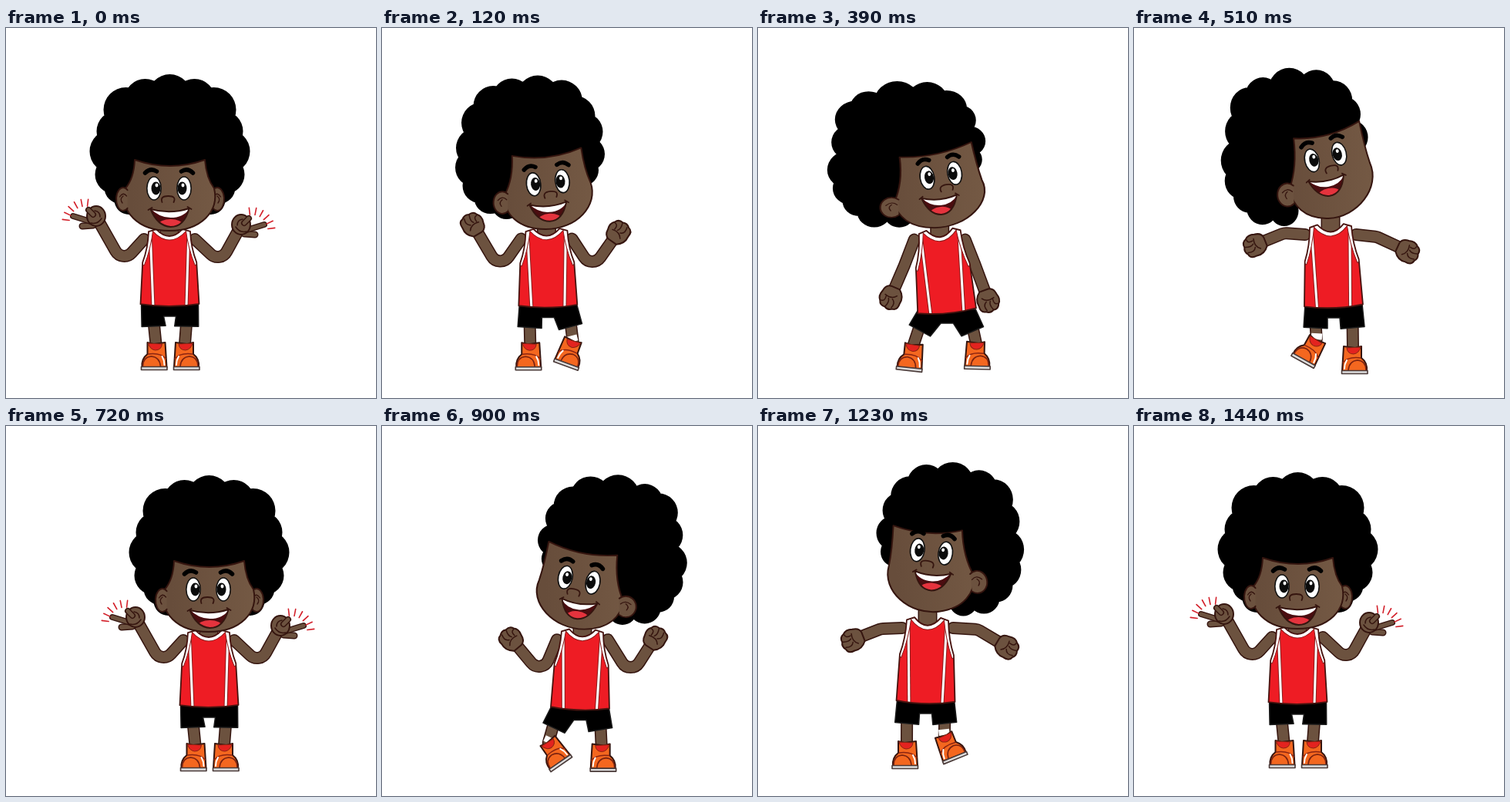
Recreate the animation shown at these times as an HTML page with a canvas. Size 480x480 px, loop 1.47 s.

```html
<!DOCTYPE html>
<html lang="en">
<head>
<meta charset="utf-8">
<title>Dancing boy</title>
<style>
  html, body { margin: 0; width: 100%; height: 100%; overflow: hidden; background: #fff; }
  canvas { display: block; }
</style>
</head>
<body>
<canvas id="stage" width="480" height="480"></canvas>
<script>
const ctx = document.getElementById('stage').getContext('2d');
const SKIN = '#6c523f', LINE = '#35150f', RED = '#ee1c24', ORANGE = '#f4671f';
const TAU = Math.PI * 2, FRAME = 30, FRAMES = 49, BEAT = 24;

// Parts are [x, y, rotation, scaleX, scaleY]; for hair the third value is the turn of the head.
const snap = {
  hair: [212.5, 151, 0, 1, 1], face: [213, 263, 0, 1, 1], eyes: [211.5, 208, 0],
  neck: [212, 264], hem: [212.5, 359],
  elbowL: [151, 305], handL: [117, 245], elbowR: [278, 305], handR: [305, 256],
  footL: [192.5, 443, 0], footR: [234, 443, 0]
};
const windup = {
  hair: [171.5, 159, 1, 1, 1], face: [211, 259, 0, 1.056, .88], eyes: [223, 193.5, -12.5],
  neck: [217, 263], hem: [222, 364],
  elbowL: [157, 322], handL: [123, 283], elbowR: [267, 321], handR: [306, 291],
  footL: [188, 444, 0], footR: [249, 433, 40]
};
const swing = {
  hair: [208, 154.5, .88, .985, 1.055], face: [248.5, 247, -2, 1, 1], eyes: [248.5, 167.5, -14],
  neck: [255, 258], hem: [259, 361],
  elbowL: [195, 266], handL: [158, 281], elbowR: [315, 271], handR: [354, 289],
  footL: [219, 433, 29], footR: [286, 448, 0]
};
const rise = {
  hair: [246, 141, .5, .97, 1.08], face: [260, 240, 0, .97, 1.08], eyes: [262, 166, -5],
  neck: [260, 252], hem: [261, 360],
  elbowL: [198, 286], handL: [152, 262], elbowR: [322, 289], handR: [364, 273],
  footL: [237, 445, 8], footR: [285, 448, 0]
};
const crouch = {
  hair: [289.5, 170, -1, 1.08, .94], face: [257, 266, 0, 1.12, .83], eyes: [243, 203, 8],
  neck: [249, 270], hem: [239, 374],
  elbowL: [206, 322], handL: [193, 374], elbowR: [289, 326], handR: [299, 371],
  footL: [193, 442, -3], footR: [285, 452, 2]
};
const swingBack = {
  hair: [249.5, 146.5, -.8, .99, 1.035], face: [229, 241, -7, 1.02, .97], eyes: [225, 163, 7],
  neck: [220, 252], hem: [217.5, 358],
  elbowL: [160, 263], handL: [124, 277], elbowR: [285, 264], handR: [322, 286],
  footL: [191, 444, 0], footR: [256, 432, -22]
};

const mapPose = (pose, fn) =>
  Object.fromEntries(Object.entries(pose).map(([name, part]) => fn(name, part)));
const shift = (pose, dx, dy) =>
  mapPose(pose, (name, [x, y, ...rest]) => [name, [x + dx, y + dy, ...rest]]);
const mirror = (pose, dy) => mapPose(pose, (name, [x, y, ...rest]) => {
  if (rest.length) rest[0] = -rest[0];
  return [name.replace(/[LR]$/, side => side === 'L' ? 'R' : 'L'), [475 - x, y + dy, ...rest]];
});

const keys = [
  [0, snap], [8, windup], [11, mirror(crouch, -4)], [17, swing], [20, rise],
  [24, shift(snap, 51, 4)], [32, mirror(windup, 4)], [35, crouch], [41, swingBack],
  [44, mirror(rise, -4)], [48, snap]
];

// Monotone cubic interpolation between the key poses.
function poseAt(frame) {
  let i = 0;
  while (i < keys.length - 2 && frame >= keys[i + 1][0]) i++;
  const span = keys[i + 1][0] - keys[i][0], u = (frame - keys[i][0]) / span;
  return mapPose(keys[i][1], (name, part) => [name, part.map((from, n) => {
    const value = k => keys[k][1][name][n];
    const slope = k => keys[k + 1] && k >= 0 ? (value(k + 1) - value(k)) / (keys[k + 1][0] - keys[k][0]) : 0;
    const tangent = k => {
      const a = slope(k - 1), b = slope(k);
      return a * b > 0 ? 2 * a * b / (a + b) : 0;
    };
    const ease = u * u * (3 - 2 * u);
    return from + (value(i + 1) - from) * ease
      + span * u * (1 - u) * ((1 - u) * tangent(i) - u * tangent(i + 1));
  })]);
}

const mix = (a, b, t) => a + (b - a) * t;
const rad = deg => deg * Math.PI / 180;

function paint(shape, fill, stroke = LINE, width = 2) {
  const path = typeof shape === 'string' ? new Path2D(shape) : shape;
  if (fill) { ctx.fillStyle = fill; ctx.fill(path); }
  if (stroke) { ctx.strokeStyle = stroke; ctx.lineWidth = width; ctx.stroke(path); }
}
function oval(x, y, rx, ry, fill, stroke, width) {
  const path = new Path2D();
  path.ellipse(x, y, rx, ry, 0, 0, TAU);
  paint(path, fill, stroke, width);
}
function limb(points, width) {
  const path = new Path2D(), [a, b, c] = points;
  path.moveTo(...a);
  if (c) { path.arcTo(...b, ...c, 13); path.lineTo(...c); } else path.lineTo(...b);
  paint(path, null, LINE, width + 3);
  paint(path, null, SKIN, width);
}
function at(x, y, degrees, sx, sy, draw) {
  ctx.save();
  ctx.translate(x, y);
  ctx.rotate(rad(degrees));
  ctx.scale(sx, sy);
  draw();
  ctx.restore();
}

// Hair bumps [x, y, radius] around the centre, clockwise from the lower left.
const leftBumps = [[-53, 72, 19], [-64, 56, 21], [-72, 39, 25], [-76, 9, 28], [-68, -17, 27], [-57, -45, 29], [-32, -58, 27]];
const frontHair = [...leftBumps, [0, -63, 28], ...leftBumps.map(([x, y, r]) => [-x, y, r]).reverse()];
const sideHair = [
  [-8, 79, 19], [-39, 77, 21], [-58, 63, 20], [-68, 46, 22], [-72, 21, 25], [-68, -16, 24], [-63, -47, 25],
  [-47, -62, 23], [-12, -71, 28], [25, -73, 25], [49, -62, 25], [64, -47, 21], [77, -19, 20], [75, 6, 18], [60, 30, 15]
];
function drawHair([x, y, turn, sx, sy]) {
  at(x, y, 0, turn < 0 ? -sx : sx, sy, () => {
    const bumps = new Path2D(), core = new Path2D();
    frontHair.forEach((front, i) => {
      const [bx, by, r] = front.map((v, n) => mix(v, sideHair[i][n], Math.abs(turn)));
      bumps.moveTo(bx + r, by);
      bumps.arc(bx, by, r, 0, TAU);
      core.lineTo(bx, by);
    });
    paint(bumps, '#000', null);
    paint(core, '#000', null);
  });
}

const frontFace = [-46, -92, 0, -76, 45, -92, 47, -68, 57, -55, 64, -25, 40, 0, -1, 0, -42, 0, -66, -25, -58, -55, -47, -68];
const sideFace = [-39, -107, 6, -105, 46, -129, 52, -95, 58, -72, 72, -40, 40, 0, 2, 0, -28, 0, -42, -18, -46, -38, -35, -68];
function drawEar(x, y, rx, dir) {
  const path = new Path2D();
  path.ellipse(x, y, rx, 15, 0, .9, TAU - .9);
  at(0, 0, 0, 1, 1, () => {
    if (dir > 0) { ctx.translate(2 * x, 0); ctx.scale(-1, 1); }
    paint(path, SKIN);
    paint(`M${x - rx * .5} ${y - 3}q${rx * .5} -7 ${rx} -1m${-rx * .5} 0q-5 4 -1 9`, null, LINE, 1.3);
  });
}
function drawFace([x, y, rot, sx, sy], turn) {
  const side = Math.abs(turn), dir = turn < 0 ? -1 : 1;
  const p = frontFace.map((v, i) => mix(v, sideFace[i], side));
  at(x, y - 60, rot, dir * sx, sy, () => {
    ctx.translate(0, 60 / sy);
    drawEar(mix(61, 38, side), mix(-41, -50, side), 9, 1);
    const shade = ctx.createLinearGradient(-50 * dir, 0, 60 * dir, 0);
    shade.addColorStop(0, '#674d3b');
    shade.addColorStop(1, '#745944');
    paint(`M${p[0]} ${p[1]}Q${p.slice(2, 6)}Q${p.slice(6, 10)}C${p.slice(10, 16)}C${p.slice(16, 22)}Q${p[22]} ${p[23]} ${p[0]} ${p[1]}Z`, shade);
    drawEar(mix(-61, -49, side), mix(-41, -31, side), mix(9, 13.5, side), -1);
  });
}

function drawFeatures([x, y, rot], turn) {
  const side = Math.abs(turn);
  at(x, y, rot, turn < 0 ? -1 : 1, 1, () => {
    ctx.lineCap = 'round';
    for (const s of [-1, 1]) {
      const ex = s * mix(19.5, 18, side), px = ex - s * 2.5;
      oval(ex, 0, 9.2, 15, '#fff', '#111', 1.6);
      oval(px, 0, 6, 8.5, '#0b0b0b', null);
      oval(px + 1, -4, 2, 2.4, '#fff', null);
      const bx = s * mix(23, 19, side);
      paint(`M${bx - s * 7} -22Q${bx + s} -27 ${bx + s * 8} -20`, null, '#000', 5.5);
    }
    const nx = mix(-1, 5, side), ny = mix(13, 16, side);
    paint(`M${nx - 8} ${ny + 5}Q${nx - 11} ${ny - 3} ${nx} ${ny - 3}Q${nx + 11} ${ny - 3} ${nx + 7} ${ny + 5}`, null, LINE, 1.8);
    ctx.translate(-8 * side, 28);
    ctx.rotate(rad(5 * side));
    ctx.scale(1 - .08 * side, 1);
    const mouth = new Path2D('M-24 -1Q2 6 26 -2Q20 22 2 22Q-15 21 -24 -1Z');
    ctx.save();
    ctx.clip(mouth);
    paint(mouth, '#4b0d10', null);
    paint('M-26 -4H28Q20 10 2 10Q-14 10 -26 -4Z', '#fff', null);
    oval(2, 20, 16, 8, '#e5333d', null);
    ctx.restore();
    paint(mouth, null);
    paint('M-27 0l5 -3M24 -4l5 3', null, LINE, 1.8);
  });
}

function drawHand([x, y], elbow, dir, snapping) {
  if (snapping) return at(x, y, 0, dir, 1, () => {
    limb([[-4, 11], [-18, 12]], 6);
    limb([[-4, 7], [-30, -1]], 5);
    oval(0, -1, 12, 13, SKIN);
    limb([[-10, -9], [-4, -3]], 5);
    paint('M-7 8Q2 10 7 2M-2 -8Q5 -7 5 0', null, LINE, 1.5);
  });
  const angle = Math.atan2(y - elbow[1], x - elbow[0]) * 180 / Math.PI;
  at(x, y, angle, 1, dir, () => {
    paint('M-13 -7Q-6 -16 4 -14Q13 -15 14 -8Q18 -3 15 2Q16 9 10 11Q5 16 -3 13Q-12 12 -13 5Z', SKIN);
    paint('M13 -6Q5 -9 2 -3M14 2Q7 -1 3 2M9 10Q9 5 2 6M-4 -7Q3 -2 0 8', null, LINE, 1.5);
  });
}
function drawSparks([x, y], dir, step) {
  at(x + 14 * dir, y + 7, 0, -dir, 1, () => {
    for (let i = 0; i < 6; i++) {
      const a = rad(187 + i * 18), c = Math.cos(a), s = Math.sin(a), r = 21 + 3 * step;
      paint(`M${c * r} ${s * r}L${c * (r + 9)} ${s * (r + 9)}`, null, '#d3202a', 1.6);
    }
  });
}

const ankle = ([x, y, rot], dir) => {
  const a = rad(rot);
  return [x - dir * 2 * Math.cos(a) + 33 * Math.sin(a), y - 33 * Math.cos(a)];
};
function drawShoe([x, y, rot], dir) {
  at(x, y, rot, -dir, 1, () => {
    paint('M-9 -35L-1 -33L14 -35L16 -3H-16Q-17 -14 -9 -20Z', ORANGE);
    paint('M-8 -34L10 -33Q9 -25 1 -25Q-6 -26 -8 -34Z', '#e3231f', '#8b2412', 1);
    paint('M-15 -4Q-15 -16 -4 -17Q7 -16 8 -4', ORANGE, '#7a2210', 1.6);
    paint('M-8 -20Q8 -22 15 -14', null, '#8b2412', 1.5);
    paint('M10 -17Q13 -12 13 -6', null, '#fff', 2);
    paint('M-17 -3.5H16.5V.5H-17Z', '#ddd', '#4a3a38', 1.6);
  });
}

function drawLegs(pose) {
  const [hx, hy] = pose.hem, cuffs = [];
  for (const [foot, dir] of [[pose.footL, -1], [pose.footR, 1]]) {
    const hip = [hx + 20 * dir, hy], end = ankle(foot, dir);
    const dx = end[0] - hip[0], dy = end[1] - hip[1], len = Math.hypot(dx, dy);
    const ux = dx / len, uy = dy / len, cx = hip[0] + ux * 28 + dir * 2, cy = hip[1] + uy * 28;
    limb([[cx, cy - 6], end], 13);
    if (Math.abs(foot[2]) > 15) {
      ctx.lineCap = 'butt';
      paint(`M${end[0] - ux * 8} ${end[1] - uy * 8}L${end[0]} ${end[1]}`, null, '#fff', 14);
      ctx.lineCap = 'round';
    }
    drawShoe(foot, dir);
    cuffs.push([cx - 15.5 * uy, cy + 15.5 * ux], [cx + 15.5 * uy, cy - 15.5 * ux]);
  }
  const [a, b, c, d] = cuffs;
  paint(`M${hx - 37} ${hy - 3}L${a}L${b}L${hx - 8} ${hy + 15}H${hx + 8}L${c}L${d}L${hx + 37} ${hy - 3}Z`, '#000', '#1a1a1a', 1.5);
}

function drawTorso({ neck, hem }) {
  const dx = hem[0] - neck[0], dy = hem[1] - neck[1];
  limb([[neck[0], neck[1] - 12], [neck[0], neck[1] + 2]], 22);
  at(...neck, -Math.atan2(dx, dy) * 180 / Math.PI, 1, Math.hypot(dx, dy) / 95, () => {
    const shirt = new Path2D('M-27 0Q-28 22 -35 40L-38 94Q0 100 38 94L35 40Q28 22 27 0L17 -3Q0 15 -17 -3Z');
    paint(shirt, RED, null);
    ctx.save();
    ctx.clip(shirt);
    for (const s of [-1, 1]) {
      const stripe = `M${s * 25} -3L${s * 21.5} 98`;
      paint(stripe, null, '#8b1a1a', 5);
      paint(stripe, null, '#fff', 3);
      paint(`M${s * 30} -4H${s * 21}Q${s * 24} 22 ${s * 33} 44L${s * 40} 40Z`, '#fff', '#8b1a1a', 1);
    }
    paint('M-18 -4Q0 16 18 -4', null, '#8b1a1a', 11);
    paint('M-18 -4Q0 16 18 -4', null, '#fff', 9);
    ctx.restore();
    paint(shirt, null, '#47130f', 1.8);
  });
}

function draw(frame) {
  const pose = poseAt(frame), turn = pose.hair[2];
  const phase = frame % BEAT, step = phase > BEAT / 2 ? phase - BEAT : phase;
  const snapping = step >= -2 && step <= 3;
  ctx.fillStyle = '#fff';
  ctx.fillRect(0, 0, 480, 480);
  ctx.lineCap = ctx.lineJoin = 'round';

  drawHair(pose.hair);
  for (const [side, dir] of [['L', -1], ['R', 1]]) {
    const elbow = pose['elbow' + side], hand = pose['hand' + side];
    limb([[pose.neck[0] + 33 * dir, pose.neck[1] + 10], elbow, hand], 13);
    drawHand(hand, elbow, -dir, snapping);
    if (snapping && step >= -1) drawSparks(hand, dir, step);
  }
  drawLegs(pose);
  drawTorso(pose);
  drawFace(pose.face, turn);
  drawFeatures(pose.eyes, turn);
}

function tick() {
  draw(Math.floor(performance.now() / FRAME) % FRAMES);
  requestAnimationFrame(tick);
}
tick();
</script>
</body>
</html>
```
